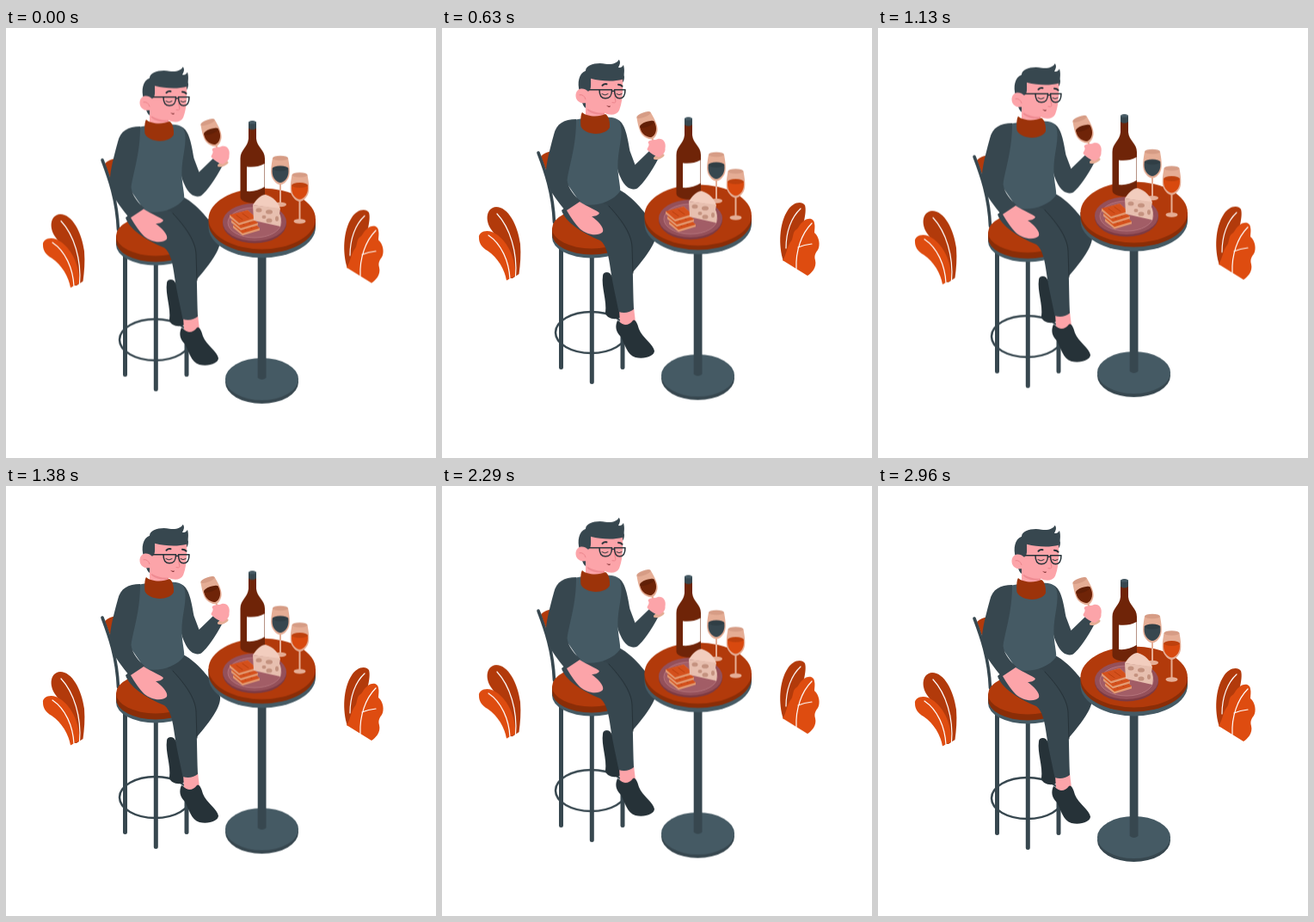
An HTML page that plays this animation: 500 px wide and 500 px high, repeating every 3 s.

```html
<!DOCTYPE html>
<html lang="en">
<head>
<meta charset="utf-8">
<title>Wine tasting</title>
<style>
  html, body { margin: 0; width: 100%; height: 100%; overflow: hidden; background: #fff; }
  svg { display: block; width: 100%; height: 100%; }
  .float { animation: float 1.5s linear -40ms infinite; }
  .slow { animation-duration: 3s; }
  @keyframes float { 50% { transform: translateY(-10px); } }

  .slate { fill: #455a64; }
  .dark { fill: #37474f; }
  .ink { fill: #263238; }
  .skin { fill: #fca4a9; }
  .rust { fill: #b23a0b; }
  .collar { fill: #9c330a; }
  .shade { fill: #8a2d07; }
  .flame { fill: #de4c10; }
  .wine { fill: #6f2408; }
  .peach { fill: #e5ad95; }
  .line { fill: none; stroke-linecap: round; stroke-linejoin: round; }
  .rib { stroke: #fff; stroke-width: 1.2; }
  .bar { stroke: #37474f; stroke-width: 5; }
  .frame { stroke: #263238; stroke-width: 1.5; }
  .fold { stroke: #263238; stroke-width: 1; }
  .blush { stroke: #e98088; stroke-width: .9; }
</style>
</head>
<body>
<svg viewBox="0 0 500 500">
  <defs>
    <g id="glass">
      <path class="line" stroke="#e5ad95" stroke-width="2" d="M0 30V53"/>
      <ellipse class="peach" cy="54" rx="7" ry="2.7"/>
      <path class="peach" d="M-9 0C-10.500 9-12 17-9.500 23C-7 28-3 31 0 31C3 31 7 28 9.500 23C12 17 10.500 9 9 0Z"/>
      <path fill="currentColor" d="M-9.300 12C-9.800 17-9.300 20-7.300 23.500C-5 27-2 28.500 0 28.500C2 28.500 5 27 7.300 23.500C9.300 20 9.800 17 9.300 12Z"/>
      <ellipse fill="currentColor" cy="12" rx="9.300" ry="3"/>
      <ellipse cy="12" rx="9.300" ry="3" opacity=".12"/>
      <ellipse rx="9" ry="2.800" fill="#d69c85"/>
    </g>
    <g id="slice">
      <path fill="#e39a72" d="M0 6L21 0L31 9V11.500L11 17.500L0 8.500Z"/>
      <path fill="#d4501c" d="M0 5.500L21 0L31 9L11 15Z"/>
      <path class="line" stroke="#b23a0b" stroke-width=".8" d="M8 6L15 11M15 4L22 9"/>
    </g>
  </defs>

  <g class="float">
    <!-- plants -->
    <path class="rust" d="M75 300C77 284 69 258 57 243C50 233 51 218 63 217C77 217 88 238 91 260C92 273 91 284 89.500 295L82 300Z"/>
    <path class="flame" d="M43 253C42 247 50 243 58 246C72 252 85 270 85.500 297L75 302.500C73 290 65 276 53 268C46 264 43 259 43 253Z"/>
    <path class="line rib" d="M85.500 298C88 270 79 241 64 225M79 301C78 280 69 260 54 250"/>
    <path class="rust" d="M397 280C391 262 392 236 402 221C407 212 418 209 422 215C425 225 418 242 412 274Z"/>
    <path class="flame" d="M396 279C400 274 401 264 405 258C409 254 407 248 411 244C415 242 416 236 420 234C424 230 432 229 433 236C434 240 433 243 433 247C439 252 440 262 437 267C433 272 433 275 434 279C436 287 430 294 425 297Z"/>
    <path class="line rib" d="M400 265C400 246 406 229 417 219M412 289C411 268 418 248 430 236M414 264Q421 261 430 260"/>

    <!-- stool -->
    <path class="rust" d="M115 158Q120 153 129 152L139 190L126 188Z"/>
    <path class="line bar" style="stroke-width:3.6" d="M112 154C120 175 129 200 130.500 235"/>
    <path class="line bar" d="M210 250V403.500"/>
    <ellipse class="line bar" style="stroke-width:2.5" cx="173.500" cy="363" rx="41.500" ry="24"/>
    <path class="line bar" d="M138.500 260V403.500M174.300 268V420.500"/>
    <path class="slate" d="M128 242V252.500A46 24 0 0 0 220 252.500V242Z"/>
    <path class="shade" d="M128 242V248.500A46 24 0 0 0 220 248.500V242Z"/>
    <ellipse class="rust" cx="174" cy="242" rx="46" ry="23.500"/>

    <!-- legs -->
    <path class="ink" d="M187 297C187 293 192 292 195 294L210 314V344C203 350 191 347 190 340C192 326 185 310 187 297Z"/>
    <path fill="#34434b" d="M176 206L206 197C225 207 243 231 249 246C250 258 238 274 221 294L205 262Z"/>
    <path class="skin" d="M206 336L223 334L225 351Q217 358 207 352Z"/>
    <path class="dark" d="M139 221C143 234 162 247 184 256C191 261 194 274 196 290C199 310 203 325 205.500 339Q215 342 223 336C222 310 222 285 221 263C220 250 208 232 192 214L160 204Z"/>
    <path class="line fold" d="M194 216C208 231 220 247 221 263L222 294"/>
    <path class="ink" d="M204 349C201 356 202 362 208 368C213 377 215 389 225 392C236 394.500 247 390 247 384.500C246 377 233 369 229 359C227 351 224 347 222 349C217 356 210 355 206 350Z"/>

    <!-- body -->
    <path class="dark" d="M203 115C212 118 215 131 218.500 152L224.500 168L241 152L252 160C243 177 234 190 227 195.500C221 198 215 195 211 189C206 181 203 172 203 165Z"/>
    <path class="slate" d="M150 117C160 113 190 111 200 113.500C207 115 209 122 208.500 131C208 145 204 155 204.500 172C205 185 208 194 207 199C198 211 180 217 162 214L144 188Z"/>
    <path class="dark" d="M156 115C142 115 133 120 130 133C124 155 119 174 121.500 186C125 200 137 213 144.500 223L161 210C154 204 147 196 145.500 186C148 168 156 147 156 115Z"/>
    <path class="skin" d="M145 221L160 211C170 217 180 221 183 224C182 227 177 228 174 228C181 233 189 241 187 246C181 252 168 249 161 243C156 238 150 230 145 221Z"/>

    <!-- head -->
    <g transform="translate(0 .7)">
      <path class="dark" d="M168 102C161 98 163 87 160 82C157 72 159 61 167 58C167 51 180 48 190 50C198 51 204 49 205.500 45C208 47 207 51 205 54C208 55 210 53 211 51C213 58 211 62 212 65C212 68 211 71 209 73L180 85Z"/>
      <path class="skin" d="M173 67C185 70 199 71 210 68C211 84 209 97 206 104C203 110 195 110 189 107V120H167V95L170 92V82C174 80 173 74 173 67Z"/>
      <path fill="#ef8b92" d="M169 102Q179 108 189 107V109Q176 110 169 104Z"/>
      <path class="skin" d="M171 83C165 76 156 78 155.500 86C155 94 163 98 171 94Z"/>
      <path class="line blush" d="M160 86Q165 85 167 91M200 84L202 94Q201 96 198 95"/>
      <path class="line fold" d="M186 85Q189.500 87.500 193 85M203 85Q206 87 209 85"/>
      <path class="line frame" style="stroke-width:2" d="M186.500 75Q188.500 73 191.500 73.500M205 74Q208 74 209.500 76"/>
      <path class="line frame" d="M171.500 80L183 80H197.500C197.500 86.500 196 90 190 90C185 90 183 86.500 183 80M197.500 82Q199 81 200.500 82M200.500 80H213C213 86.500 211 90 206.500 90C202 90 200.500 86.500 200.500 80Z"/>
      <path fill="#7c2c2f" d="M191 98Q194 100 196 98.500Q195 102.500 191 98Z"/>
    </g>
    <path class="collar" d="M163 107C168 112 182 113 190 109C194 111 195.500 119 195 124.500C190 134.500 167 134.500 161.500 123.500C161 118 161 110 163 107Z"/>

    <!-- raised glass -->
    <use href="#glass" transform="translate(234.500 110) rotate(-20) scale(.96)" color="#6f2408"/>
    <path class="skin" d="M239 151C237 149 243 146 239.500 142C241 138 248 140 251 138C257 137 261 142 259.500 149C260 154 256 157 252 159Q245 157 239 151Z"/>
  </g>

  <g class="float slow">
    <!-- table -->
    <ellipse class="dark" cx="297.500" cy="412" rx="42.500" ry="25"/>
    <ellipse class="slate" cx="297.500" cy="408.500" rx="42.500" ry="24.500"/>
    <path class="dark" d="M292.700 260H302.500V407Q297.500 411 292.700 407Z"/>
    <path class="slate" d="M235.500 222V232A62.200 35.500 0 0 0 360 232V222Z"/>
    <path class="shade" d="M235.500 222V227A62.200 35.500 0 0 0 360 227V222Z"/>
    <ellipse class="rust" cx="297.700" cy="222" rx="62.200" ry="35.500"/>

    <!-- bottle -->
    <path class="wine" d="M282 114V129C281 139 272.500 142 272.500 152V197C273 206 301 206 301 197V152C301 142 292 139 291 129V114Z"/>
    <path class="dark" d="M282 110Q286.500 106 291 110V117Q286.500 120 282 117Z"/>
    <ellipse class="slate" cx="286.500" cy="110" rx="4.500" ry="1.800"/>
    <path fill="#fff" d="M280 161.500Q291 163 300.500 158V185Q291 191 280 190Z"/>

    <use href="#glass" transform="translate(319 151.500)" color="#37474f"/>
    <use href="#glass" transform="translate(341.500 171)" color="#d8490f"/>

    <!-- plate -->
    <ellipse cx="289" cy="228" rx="37" ry="22.500" fill="#7d3a43"/>
    <ellipse cx="289" cy="226" rx="37" ry="22" fill="#94505a"/>
    <ellipse cx="289" cy="226.500" rx="31" ry="17.500" fill="#a25d66" stroke="#b5747c"/>
    <use href="#slice" x="264" y="224"/>
    <use href="#slice" x="262" y="218"/>
    <use href="#slice" x="260" y="212"/>
    <path fill="#f2cdbe" d="M287 206C291 200 296 194 302 194C311 197 317 203 319 211Z"/>
    <path fill="#e7bfaf" d="M287 206L319 210L318 216Q321 220 319 231L288 224Z"/>
    <g fill="#c4927f">
      <ellipse cx="294" cy="212" rx="3.500" ry="2.500"/>
      <ellipse cx="306" cy="214" rx="4" ry="2.600"/>
      <ellipse cx="300" cy="220" rx="2.500" ry="2"/>
      <ellipse cx="306" cy="224" rx="3.500" ry="2.600"/>
      <ellipse cx="315" cy="222" rx="2" ry="3"/>
    </g>
  </g>
</svg>
</body>
</html>
```
